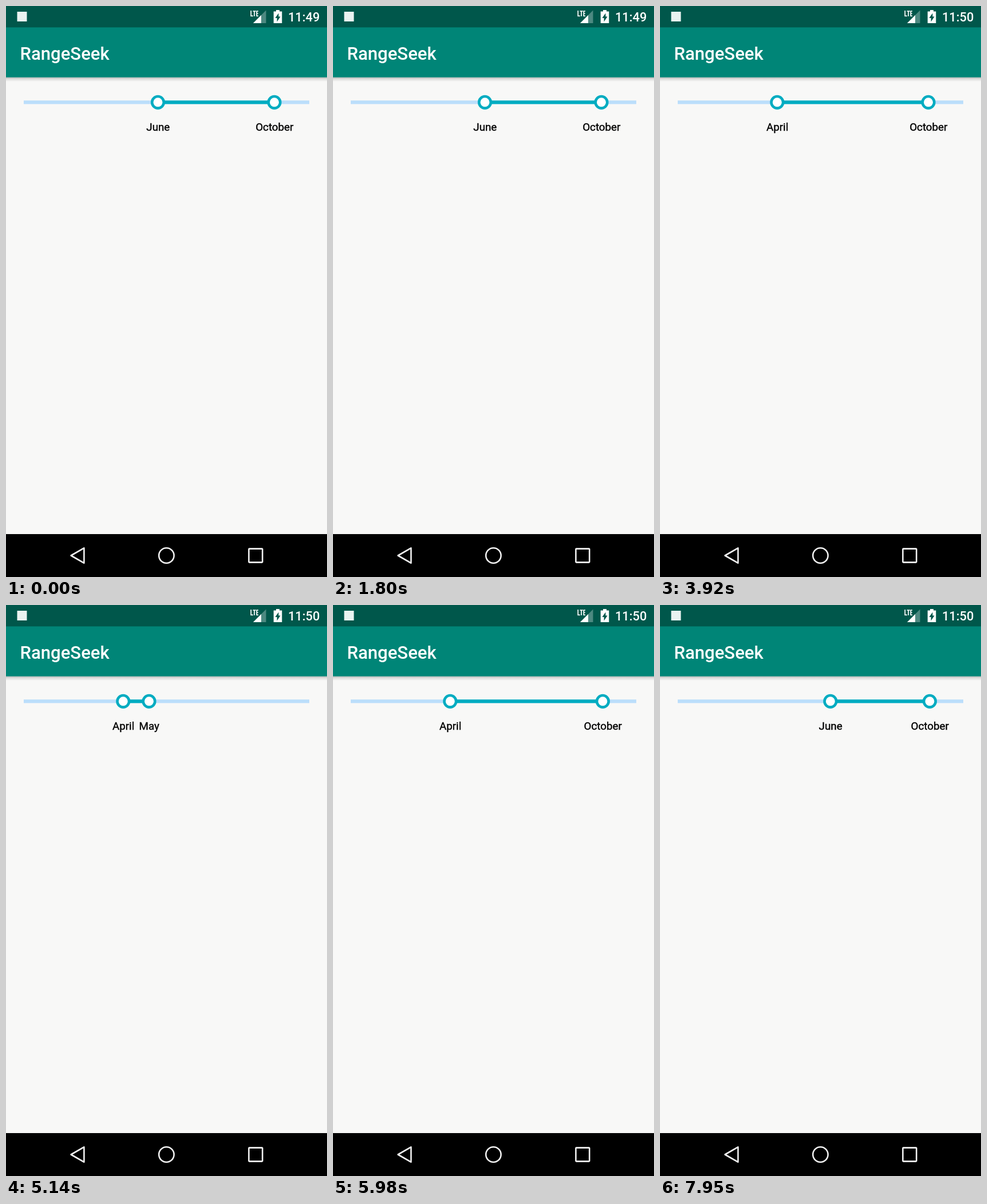
An HTML page for the animation above (8 s loop, 561 by 998 pixels).

```html
<!DOCTYPE html>
<html lang="en">
<head>
<meta charset="utf-8">
<title>Range slider</title>
<style>
  html, body { margin: 0; width: 100%; height: 100%; overflow: hidden; background: #f8f8f7; }
  svg { display: block; width: 561px; height: 998px; }
  text { font-family: Roboto, sans-serif; }
  .medium { font-weight: 500; fill: #fff; }
  .label { font-size: 18.8px; text-anchor: middle; stroke: #000; stroke-width: .4; }
  .thumb { fill: #fff; stroke: #00acc1; stroke-width: 4.6; }
  .nav { fill: none; stroke: #f2f2f2; stroke-width: 2.6; }
</style>
</head>
<body>
<svg viewBox="0 0 561 998">
  <defs>
    <linearGradient id="shade" x2="0" y2="1">
      <stop offset="0" stop-color="#000" stop-opacity=".27"/>
      <stop offset=".4" stop-color="#000" stop-opacity=".1"/>
      <stop offset="1" stop-color="#000" stop-opacity="0"/>
    </linearGradient>
  </defs>

  <rect width="561" height="998" fill="#f8f8f7"/>
  <rect y="124.5" width="561" height="8" fill="url(#shade)"/>
  <rect y="37" width="561" height="87.7" fill="#008577"/>
  <rect width="561" height="37.4" fill="#00574b"/>
  <text class="medium" x="24.5" y="93.7" font-size="31.1">RangeSeek</text>

  <!-- status icons -->
  <rect x="19.5" y="10" width="17" height="17" fill="#eaf3f1"/>
  <path d="M428.2 8v9.4h3.6M431.4 9h5.4M434.1 9v9M441 9h-2.8v8.3h2.8M438 13h2.7" fill="none" stroke="#fff" stroke-width="1.7"/>
  <path d="M454.5 7.5V30H432Z" fill="#fff" fill-opacity=".3"/>
  <path d="M446 16V30H432Z" fill="#fff"/>
  <path d="M472 7h6v2.6h4.3V30h-14.6V9.6H472Z" fill="#fff"/>
  <path d="M476.4 12.5v6h3.2l-6 9v-6.6h-3.2Z" fill="#00574b"/>
  <text class="medium" id="clock" x="548.3" y="27.3" font-size="21.8" text-anchor="end">11:49</text>

  <!-- slider -->
  <rect x="31" y="165.2" width="499" height="6.2" fill="#bbdefb"/>
  <rect id="range" y="165.2" height="6.2" fill="#00acc1"/>
  <circle class="thumb" id="lowThumb" cy="168.3" r="10.3"/>
  <circle class="thumb" id="highThumb" cy="168.3" r="10.3"/>
  <text class="label" id="lowLabel"></text>
  <text class="label" id="highLabel"></text>

  <!-- navigation bar -->
  <rect y="923" width="561" height="75"/>
  <path class="nav" d="M113.6 960.5L136.4 947.4V973.6Z" stroke-linejoin="round"/>
  <circle class="nav" cx="280.4" cy="960.5" r="13.2"/>
  <rect class="nav" x="424.4" y="948.6" width="23.8" height="23.8" rx=".8"/>
</svg>
<script>
const LOOP = 8000, TICK = 45;
const TRACK_X = 31, TRACK_W = 499, BASELINE = 218.3, SPLIT = 12.5;
const MONTHS = ['January', 'February', 'March', 'April', 'May', 'June', 'July',
  'August', 'September', 'October', 'November', 'December'];

// Each drag is a list of [time, x] points, starting with its first visible step.
const lowDrags = [
  [[3090, 242], [3225, 160], [3405, 97.5], [3495, 104], [3675, 165], [3855, 204.8]],
  [[6980, 216], [7160, 300], [7385, 425], [7520, 471], [7655, 471], [7790, 430], [7925, 297.8]]
];
const highDrags = [
  [[4870, 455], [4960, 375], [5140, 250], [5275, 206], [5410, 206], [5545, 290], [5680, 368], [5815, 436], [5950, 471.4]]
];

const el = id => document.getElementById(id);
const set = (id, attrs) => {
  for (const name in attrs) el(id).setAttribute(name, attrs[name]);
};

function along(points, t) {
  const i = points.findIndex(p => p[0] > t);
  if (i < 0) return points[points.length - 1][1];
  const [t0, x0] = points[i - 1], [t1, x1] = points[i];
  return x0 + (x1 - x0) * (t - t0) / (t1 - t0);
}

function position(drags, rest, t) {
  const drag = drags.filter(d => d[0][0] <= t).pop();
  if (!drag) return rest;
  const start = drag[0][0];
  return along(drag, start + Math.floor((t - start) / TICK) * TICK);
}

const month = x => MONTHS[Math.floor((x - TRACK_X) / TRACK_W * 11)];

function placeLabel(id, x) {
  el(id).textContent = month(x);
  set(id, { x: x + 0.3 });
  return el(id).getComputedTextLength() / 2;
}

function draw(t) {
  const high = position(highDrags, 469, t);
  const low = Math.min(position(lowDrags, 265.5, t), high);
  set('range', { x: low, width: high - low });
  set('lowThumb', { cx: low });
  set('highThumb', { cx: high });

  // Labels that would collide are stacked around the baseline.
  const reach = placeLabel('lowLabel', low) + placeLabel('highLabel', high);
  const shift = high - low < reach ? SPLIT : 0;
  set('lowLabel', { y: BASELINE - shift });
  set('highLabel', { y: BASELINE + shift });

  el('clock').textContent = t < 3920 ? '11:49' : '11:50';
}

function frame() {
  draw(performance.now() % LOOP);
  requestAnimationFrame(frame);
}
frame();
</script>
</body>
</html>
```
